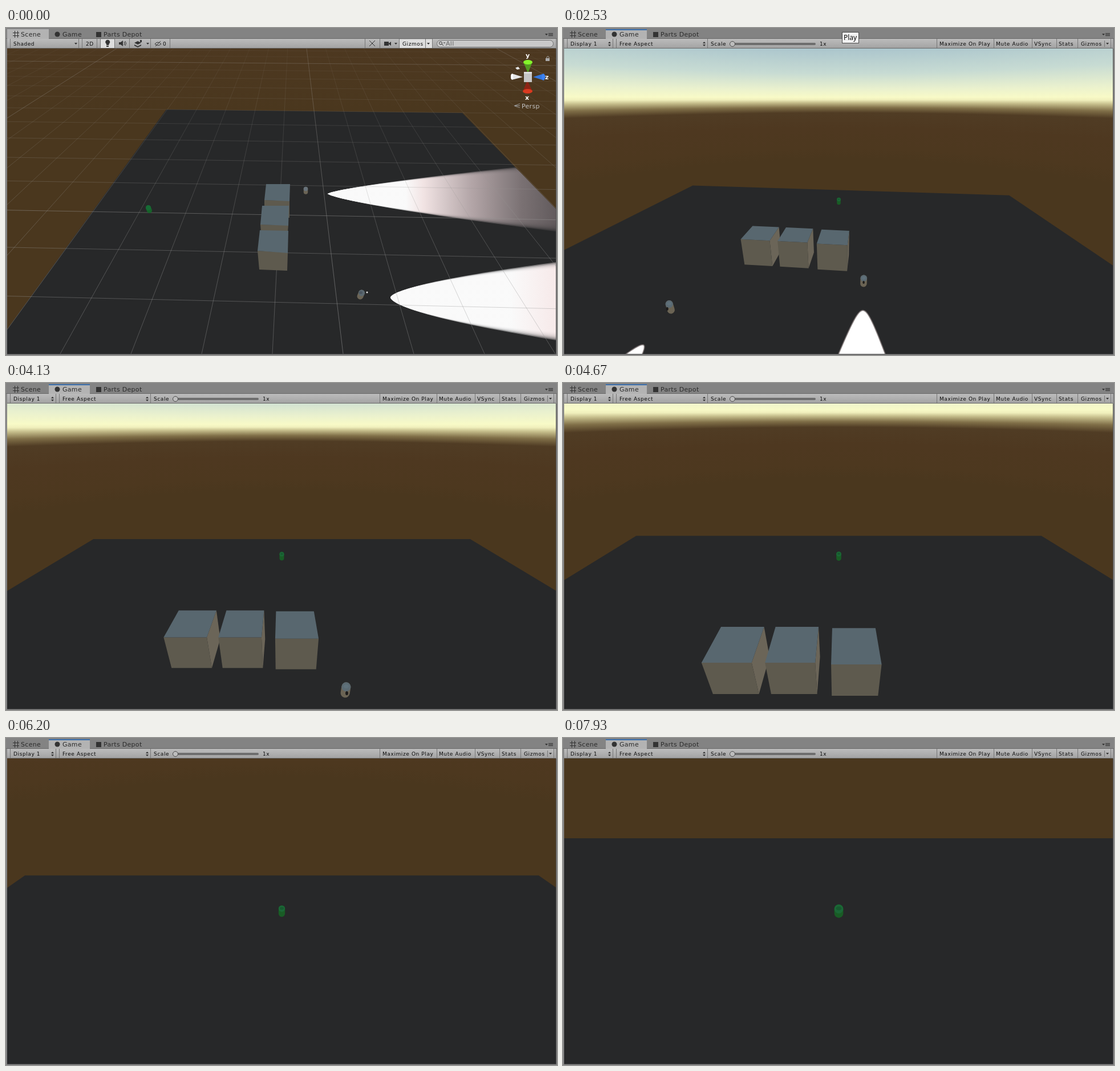
An HTML page with a canvas that plays this animation: 966 px wide and 574 px high, repeating every 8000 ms.

```html
<!DOCTYPE html>
<html lang="en">
<head>
<meta charset="utf-8">
<title>Editor play mode</title>
<style>
html, body { margin: 0; width: 100%; height: 100%; overflow: hidden; background: #828282; }
#stage { position: relative; width: 966px; height: 574px; overflow: hidden; }
canvas, svg { position: absolute; left: 0; top: 0; display: block; }
text { font: 9px "DejaVu Sans", sans-serif; letter-spacing: .6px; fill: #0c0c0c; }
.tab { font-size: 11px; letter-spacing: .3px; fill: #2b2b2b; }
.axis { font-size: 11px; font-weight: bold; fill: #fff; letter-spacing: 0; }
.soft { font-size: 11px; letter-spacing: .3px; fill: #c4c4c4; }
.sep { stroke: #767676; fill: none; }
.ink { fill: #333; }
.line { stroke: #333; fill: none; }
</style>
</head>
<body>
<div id="stage">
<canvas id="view" width="966" height="574"></canvas>
<svg width="966" height="574" viewBox="0 0 966 574">
  <defs>
    <linearGradient id="bar" x2="0" y2="1">
      <stop stop-color="#bcbcbc"/><stop offset="1" stop-color="#a3a3a3"/>
    </linearGradient>
  </defs>
  <path d="M0 0H966V19H0z" fill="#838383"/>
  <path d="M2 19H964V35H2z" fill="url(#bar)"/>
  <path d="M0 18.5H966M2 35.5H964" stroke="#686868"/>
  <path d="M1 19V573H965V19" fill="none" stroke="#858585" stroke-width="2"/>
  <path d="M2 572.5H964.5V36" fill="none" stroke="#555"/>
  <path class="sc" d="M2 19V2H75V19z" fill="#b3b3b3"/>
  <g class="gm">
    <path d="M75 19V2H147V19z" fill="#b3b3b3"/>
    <path d="M75 2H147V4H75z" fill="#3a6fae"/>
  </g>
  <path class="line" d="M12 8.5H23M12 13.5H23M15.5 5V17M20.5 5V17"/>
  <circle class="ink" cx="90" cy="11" r="4.5" fill="#222"/>
  <path class="ink" d="M158 7H167V16H158z"/>
  <text class="tab" x="26" y="15">Scene</text>
  <text class="tab" x="99" y="15">Game</text>
  <text class="tab" x="171" y="15">Parts Depot</text>
  <path class="ink" d="M945 10H950L947.5 13z"/>
  <path class="line" d="M951 9.5H959M951 11.5H959M951 13.5H959"/>

  <g class="sc">
    <path d="M166 20H190V35H166zM690 20H747V35H690z" fill="#dedede"/>
    <path class="sep" d="M7.5 19V35M127.5 19V35M133.5 19V35M159.5 19V35M165.5 19V35M190.5 19V35M216.5 19V35M253.5 19V35M287.5 19V35M629.5 19V35M655.5 19V35M689.5 19V35M735.5 19V35M747.5 19V35"/>
    <text x="13" y="31" font-weight="bold" style="letter-spacing:.5px">Shaded</text>
    <text x="140" y="31">2D</text>
    <text x="275" y="31">0</text>
    <text x="695" y="31">Gizmos</text>
    <path class="ink" d="M120 26h5l-2.500 3zM246 26h5l-2.500 3zM681 26h5l-2.500 3zM738 26h5l-2.500 3z"/>
    <path class="ink" d="M176 30V28A4 4 0 1 1 180.500 28V30zM176 31h4v2h-4zM198 25h3l4-3v10l-4-3h-3zM663 24h8v7h-8zM671 27l4-3v7l-4-3z"/>
    <path class="line" d="M207 24q2 3 0 6M209 23q3 4 0 8M637 22l10 10M647 22l-10 10"/>
    <path class="ink" d="M225 26l6-3 6 3-6 3zM225 29l6 3 6-3v2l-6 3-6-3zM235 21h3v4h-3z"/>
    <path class="line" d="M261 28q5-6 11 0q-5 5-11 0M262 32l9-9"/>
    <rect x="755.500" y="21.500" width="204" height="12" rx="6" fill="#c9c9c9" stroke="#707070"/>
    <circle class="line" cx="762" cy="26.500" r="2.500"/>
    <path class="line" d="M764 28l3 3M767 26h3"/>
    <text x="771" y="31" class="tab" style="fill:#666">All</text>

    <path d="M907 60L915 79 923 60z" fill="#549a22"/>
    <ellipse cx="915" cy="60" rx="8" ry="4" fill="#85f52b"/>
    <path d="M893 70l5-2 3 4-5 1zM887 80L906 86 887 91z" fill="#e6e6e6"/>
    <ellipse cx="887" cy="85.500" rx="2" ry="5" fill="#fff"/>
    <path d="M924 86L943 80 946 86 943 92z" fill="#3476dc"/>
    <ellipse cx="942" cy="86" rx="3" ry="5.500" fill="#3b82f4"/>
    <path d="M906 111L914 92 923 111z" fill="#8b2415"/>
    <ellipse cx="914.500" cy="111" rx="8.500" ry="4" fill="#d93a20"/>
    <path d="M908 77H922V95H908z" fill="#c6c6c6"/>
    <path d="M908 77H922V80H908z" fill="#dedede"/>
    <text class="axis" x="911" y="52">y</text>
    <text class="axis" x="945" y="90">z</text>
    <text class="axis" x="910" y="126">x</text>
    <path d="M901 133L891 136.500 901 140M891 136.500H901" fill="none" stroke="#9d9d9d"/>
    <text class="soft" x="904" y="141">Persp</text>
    <path d="M946 53h7v5h-7z" fill="#aaa"/>
    <path d="M948 53v-2q2-3 4 0v2" fill="none" stroke="#aaa"/>
  </g>

  <g class="gm">
    <path class="sep" d="M7.5 19V35M87.500 19V35M93.500 19V35M253.500 19V35M655.500 19V35M755.500 19V35M822.500 19V35M865.500 19V35M902.500 19V35M949.500 22V33M960.500 19V35"/>
    <text x="13" y="31">Display 1</text>
    <text x="99" y="31">Free Aspect</text>
    <text x="259" y="31">Scale</text>
    <text x="450" y="31">1x</text>
    <text x="660" y="31">Maximize On Play</text>
    <text x="759" y="31">Mute Audio</text>
    <text x="826" y="31">VSync</text>
    <text x="869" y="31">Stats</text>
    <text x="908" y="31">Gizmos</text>
    <path class="ink" d="M79 27h5l-2.500-3zM79 29h5l-2.500 3zM245 27h5l-2.500-3zM245 29h5l-2.500 3zM952 26h5l-2.500 3z"/>
    <rect x="293" y="26" width="150" height="4" rx="2" fill="#6d6d6d"/>
    <circle cx="297" cy="28" r="4.500" fill="#bdbdbd" stroke="#4a4a4a"/>
  </g>

  <g id="tip">
    <rect x="489.500" y="7.500" width="29" height="19" fill="#f2f2f2" stroke="#4c4c4c"/>
    <text x="492" y="21" style="font:12px 'Noto Sans',sans-serif;letter-spacing:0">Play</text>
  </g>
</svg>
</div>
<script>
const ctx = document.getElementById('view').getContext('2d');
const tip = document.getElementById('tip');
const sceneUi = document.querySelectorAll('.sc');
const gameUi = document.querySelectorAll('.gm');

const LOOP = 8000, TIP_ON = 1270, SWITCH = 2530, MOVE = 2730, STEP = 1000 / 15;
const FLOOR = '#272829', BROWN = '#4a371e';
const TOP = '#58676f', FRONT = '#5e5a4e', SIDE = '#6b6558';

function poly(points, fill) {
  ctx.beginPath();
  points.forEach(([x, y]) => ctx.lineTo(x, y));
  ctx.closePath();
  ctx.fillStyle = fill;
  ctx.fill();
}

function dot(x, y, rx, ry, fill) {
  ctx.beginPath();
  ctx.ellipse(x, y, rx, ry, 0, 0, 7);
  ctx.fillStyle = fill;
  ctx.fill();
}

// Rounded bar from a (top) to b (bottom)
function pill(a, b, width, body, cap) {
  ctx.lineCap = 'round';
  ctx.lineWidth = width;
  ctx.strokeStyle = body;
  ctx.beginPath();
  ctx.moveTo(...a);
  ctx.lineTo(...b);
  ctx.stroke();
  dot(a[0], a[1], width / 2, width / 2, cap);
}

/* ---------- editor view ---------- */

function gridLine(x1, y1, x2, y2, major) {
  const g = ctx.createLinearGradient(0, 36, 0, 420);
  g.addColorStop(0, `rgba(150,145,140,${major ? .3 : .07})`);
  g.addColorStop(1, `rgba(150,150,150,${major ? .52 : .4})`);
  ctx.strokeStyle = g;
  ctx.lineWidth = 1;
  ctx.beginPath();
  ctx.moveTo(x1, y1);
  ctx.lineTo(x2, y2);
  ctx.stroke();
}

function grid() {
  for (let k = -28; k <= 28; k++) {
    gridLine(527 + 33.3 * k, 36, 591 + 124 * k, 572, k % 10 === 0);
  }
  for (let j = -7; j <= 7; j++) {
    const h = 1 / (.003289 - .000244 * j), y = h - 161;
    const x = 281 - .7228 * (y - 143), slope = h * 3.65e-5;
    gridLine(2, y + slope * (2 - x), 964, y + slope * (964 - x), Math.abs(j) === 5);
  }
}

// Light pool on the floor, layered for a soft rim
function pool(ax, ay, up, down, power, spread, fill) {
  const layers = 9, span = 964 - ax;
  ctx.fillStyle = fill;
  for (let i = 0; i < layers; i++) {
    const f = 1 - spread * i / layers;
    const edge = (s, h) => ay + s * h * Math.pow(s ? 1 : 0, 1) * f;
    ctx.globalAlpha = .34;
    ctx.beginPath();
    for (let n = -40; n <= 40; n++) {
      const q = (n / 40) ** 2;
      const h = n < 0 ? -up : down;
      const fade = 1 - (1 - f) * q;
      ctx.lineTo(ax + span * q, ay + h * Math.pow(q, power) * fade);
    }
    ctx.fill();
  }
  ctx.globalAlpha = 1;
}

function fade(x1, x2, stops) {
  const g = ctx.createLinearGradient(x1, 0, x2, 0);
  stops.forEach(([at, color]) => g.addColorStop(at, color));
  return g;
}

function drawScene() {
  const g = ctx.createLinearGradient(0, 36, 0, 150);
  g.addColorStop(0, '#4d3820');
  g.addColorStop(1, BROWN);
  ctx.fillStyle = g;
  ctx.fillRect(2, 36, 962, 536);
  const floor = [[281, 143], [800, 149], [1211, 572], [-29, 572]];
  poly(floor, FLOOR);

  ctx.save();
  ctx.beginPath();
  floor.forEach(p => ctx.lineTo(...p));
  ctx.clip();
  pool(564, 291, 54, 66, .75, .3, fade(564, 964, [
    [0, '#fff'], [.34, '#fff'], [.42, '#f6e8e8'], [.62, '#b9abad'], [.85, '#7c7375'], [1, '#645c5e']]));
  pool(674, 473, 62, 75, .62, .22, fade(674, 964, [
    [0, '#fff'], [.72, '#fff'], [1, '#fbeeee']]));
  ctx.restore();
  grid();

  poly([[453, 302], [497, 303], [497, 333], [453, 333]], FRONT);
  poly([[456, 274], [498, 274], [497, 304], [453, 302]], TOP);
  poly([[446, 345], [495, 346], [494, 358], [447, 358]], FRONT);
  poly([[449, 312], [496, 312], [495, 347], [446, 345]], TOP);
  poly([[441, 391], [494, 394], [493, 426], [444, 424]], FRONT);
  poly([[445, 355], [495, 356], [494, 395], [441, 391]], TOP);

  pill([525.5, 282.5], [525.5, 288], 7.5, '#6b6455', '#67727a');
  pill([623.5, 465], [621, 471], 11, '#6b6455', '#5b6870');
  dot(622, 464.5, 3, 2.5, '#4b5660');
  dot(633, 464, 1.5, 1.5, '#e8e8e8');
  pill([249.5, 315.5], [251.5, 320.5], 9, '#17622a', '#176b35');
}

/* ---------- game view ---------- */

const FOCAL = 464.2, CX = 483.5, CY = 304, EYE = 27;
const SKY = [
  [.15, 172, 198, 205], [.08, 199, 219, 211], [.03, 234, 241, 206], [.004, 248, 250, 199],
  [-.004, 240, 239, 188], [-.014, 196, 188, 138], [-.03, 128, 111, 72], [-.0475, 80, 60, 36],
  [-.1, 78, 56, 32], [-.17, 77, 56, 31], [-.21, 74, 55, 30]];
const BLOCKS = [[-11.18, -26.9], [-4.85, -26.9], [1.74, -27.1]];
const GUARDS = [[7, -33.2], [-18.7, -41.1]];

// The camera always faces the green capsule at (0, 1, 0)
function camera(sec) {
  const x = Math.max(0, 6.4 - 5.9 * sec), z = 66.68 - 9.96 * sec;
  const d = Math.hypot(x, z), slant = Math.hypot(d, EYE - 1);
  const st = x / d, ct = z / d, sp = (EYE - 1) / slant, cp = d / slant;
  const project = (px, py, pz) => {
    const ahead = d - px * st + pz * ct, side = px * ct + pz * st, drop = EYE - py;
    const depth = ahead * cp + drop * sp, k = FOCAL / depth;
    return [CX + side * k, CY - (ahead * sp - drop * cp) * k, k, depth];
  };
  return { x, z, sp, cp, project };
}

function drawSky({ sp, cp }) {
  const w = 4;
  for (let x = 2; x < 964; x += w) {
    const u = (x + w / 2 - CX) / FOCAL;
    const yAt = s => {
      let v = sp / cp;
      for (let i = 0; i < 5; i++) v = (sp + s * Math.sqrt(1 + u * u + v * v)) / cp;
      return CY - v * FOCAL;
    };
    const ys = SKY.map(c => yAt(c[0])), y0 = ys[0], y1 = ys[ys.length - 1];
    const g = ctx.createLinearGradient(0, y0, 0, y1);
    SKY.forEach(([, r, gr, b], i) => {
      const at = Math.min(1, Math.max(0, (ys[i] - y0) / (y1 - y0)));
      g.addColorStop(at, `rgb(${r},${gr},${b})`);
    });
    ctx.fillStyle = g;
    ctx.fillRect(x, 36, w, 536);
  }
}

function drawBlock(cam, x, z) {
  const p = (a, b, c) => cam.project(x + a * 2.5, b, z + c * 2.5);
  const side = cam.x > x + 2.5 ? 1 : cam.x < x - 2.5 ? -1 : 0;
  if (side) poly([p(side, 0, -1), p(side, 5, -1), p(side, 5, 1), p(side, 0, 1)], SIDE);
  poly([p(-1, 0, -1), p(-1, 5, -1), p(1, 5, -1), p(1, 0, -1)], FRONT);
  poly([p(-1, 5, -1), p(-1, 5, 1), p(1, 5, 1), p(1, 5, -1)], TOP);
}

function drawBeam(cam, x, z) {
  const reach = Math.min(30, cam.z + z + 1);
  if (reach <= 5) return;
  ctx.beginPath();
  for (let i = -40; i <= 40; i++) {
    const s = 5 + (reach - 5) * (i / 40) ** 2;
    const half = Math.sqrt(Math.max(0, (s * .25) ** 2 - 1.5625)) * Math.sign(i);
    const [px, py] = cam.project(x + half, 0, z - s);
    ctx.lineTo(px, py);
  }
  ctx.fillStyle = '#fff';
  ctx.fill();
  ctx.strokeStyle = 'rgba(125,115,115,.7)';
  ctx.lineWidth = 2;
  ctx.stroke();
}

function drawCapsule(cam, x, z, body, cap, inner) {
  const top = cam.project(x, 1.5, z), low = cam.project(x, .5, z), k = top[2];
  if (top[3] < 2) return;
  pill(top.slice(0, 2), low.slice(0, 2), k, body, cap);
  dot(top[0], top[1] - k * .06, k * .3, k * .22, inner);
}

function drawGame(sec) {
  const cam = camera(sec), p = cam.project;
  drawSky(cam);
  const near = -cam.z - 3;
  poly([p(-50, 0, 12.3), p(50, 0, 12.3), p(50, 0, near), p(-50, 0, near)], FLOOR);
  drawCapsule(cam, 0, 0, '#195c25', '#1b6836', '#17592f');
  BLOCKS.forEach(([x, z]) => drawBlock(cam, x, z));
  GUARDS.forEach(([x, z]) => {
    drawBeam(cam, x, z);
    drawCapsule(cam, x, z, '#6b6454', '#5b6a72', '#5f717b');
    const [ex, ey, k] = p(x, 1.15, z - .5);
    dot(ex, ey, k * .15, k * .22, '#1d1c1b');
  });
}

/* ---------- playback ---------- */

const show = (nodes, on) => nodes.forEach(n => { n.style.display = on ? '' : 'none'; });

function frame() {
  const t = performance.now() % LOOP, playing = t >= SWITCH;
  show(sceneUi, !playing);
  show(gameUi, playing);
  show([tip], t >= TIP_ON && t < MOVE);
  ctx.save();
  ctx.beginPath();
  ctx.rect(2, 36, 962, 536);
  ctx.clip();
  if (playing) drawGame(Math.max(0, Math.floor((t - MOVE) / STEP + .05) * STEP / 1000));
  else drawScene();
  ctx.restore();
  requestAnimationFrame(frame);
}
frame();
</script>
</body>
</html>
```
